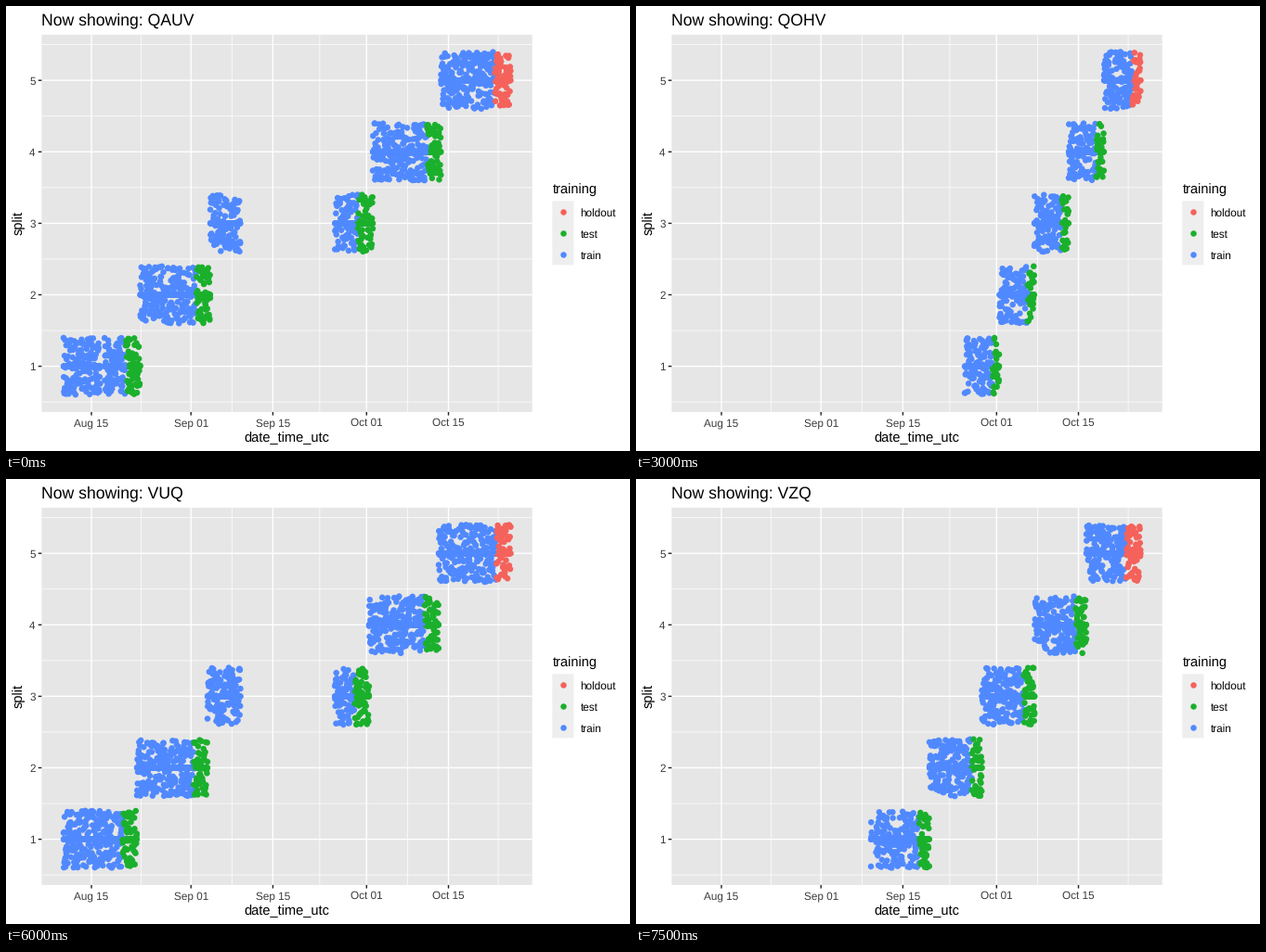
A matplotlib script for the animation above (8 s loop, 672 by 480 pixels).

```python
import numpy as np
import matplotlib.pyplot as plt
from matplotlib.animation import FuncAnimation
from matplotlib.patches import Rectangle

plt.rcParams["font.family"] = "Liberation Sans"
plt.rcParams["text.hinting"] = "none"

W, H, DPI = 672, 480, 96
PX = 72 / DPI
LEFT, RIGHT, TOP, BOTTOM = 38.4, 566.7, 31.0, 437.9
DAY = 6.305
ROW = 77.1
TRAIN, TEST, HOLDOUT = "#5089FF", "#1AB02C", "#F5625B"
DOT = (6.5 * PX) ** 2

SYMBOLS = ["QAUV", "QEZ", "QIJ", "QOHV", "QOWU", "QUJ", "VUQ", "VZQ"]

# edges: limits of the five splits, cuts: where training ends,
# gaps: spans without data, late: height of a lone late observation
MID_GAP = (252.5, 354)
SERIES = [
    dict(edges=[62, 144.5, 220, 395, 468.5, 543.5],
         cuts=[129, 205, 379, 453.5, 526.5], gaps=[MID_GAP, (101.5, 106)]),
    dict(edges=[62, 139, 215, 392, 467, 543.5],
         cuts=[123.5, 199.5, 376.5, 452, 528], gaps=[MID_GAP]),
    dict(edges=[354, 392, 430, 467, 505, 543.5],
         cuts=[385, 421.5, 459.5, 496.5, 535.5], gaps=[]),
    dict(edges=[354, 391.5, 429, 466, 504, 543.5],
         cuts=[384, 421.5, 458.5, 495.5, 534.5], gaps=[]),
    dict(edges=[62, 99, 138, 177, 214.5, 252.5],
         cuts=[91.5, 130, 168.5, 206.5, 244.5], gaps=[], late=4.85),
    dict(edges=[62, 151, 214.5, 388, 472.5, 543.5],
         cuts=[129, 201.5, 376, 448.5, 529.5],
         gaps=[MID_GAP, (83, 90.5), (142, 149), (433.5, 441), (457.5, 467)]),
    dict(edges=[62, 141, 217, 391, 466, 543.5],
         cuts=[125.5, 202, 375.5, 451, 528], gaps=[MID_GAP]),
    dict(edges=[62, 120, 178, 236.5, 295, 354],
         cuts=[108, 166, 224, 282.5, 341], gaps=[], late=5.13),
    dict(edges=[253, 316, 372.5, 429.5, 485, 543.5],
         cuts=[305, 361.5, 417.5, 473.5, 528], gaps=[(254, 258)]),
]


def row_y(split):
    return 388.6 - ROW * (split - 1)


def scatter_data(index, edges, cuts, gaps, late=None):
    """Hourly observations: one layer on the line, one jittered layer above."""
    rng = np.random.default_rng(40 + index)
    xs, splits, colors = [], [], []
    for i, cut in enumerate(cuts):
        held = HOLDOUT if i == 4 else TEST
        for x in np.arange(edges[i], edges[i + 1], DAY / 24):
            missing = any(a < x < b for a, b in gaps)
            if missing or rng.random() < 0.05:
                continue
            xs.append(x)
            splits.append(i + 1)
            colors.append(TRAIN if x < cut else held)
    heights = np.array(splits) + rng.uniform(-0.4, 0.4, len(xs))
    if late:
        xs.append(532.8)
        splits.append(5)
        colors.append(HOLDOUT)
        heights = np.append(heights, late)
    x = np.tile(xs, 2)
    y = row_y(np.concatenate([splits, heights]))
    settled = y.copy()
    moved = rng.integers(len(xs), 2 * len(xs) - 1, 5)
    settled[moved] += rng.uniform(-3, 3, 5)
    settled = np.clip(settled, row_y(5.4), row_y(0.6))
    return np.c_[x, y], np.c_[x, settled], colors * 2


DATA = [scatter_data(i, **s) for i, s in enumerate(SERIES)]

fig = plt.figure(figsize=(W / DPI, H / DPI), dpi=DPI, facecolor="white")
ax = fig.add_axes([0, 0, 1, 1])
ax.set_xlim(0, W)
ax.set_ylim(H, 0)
ax.axis("off")


def rect(x0, y0, x1, y1, color):
    ax.add_patch(Rectangle((x0, y0), x1 - x0, y1 - y0, fc=color, lw=0,
                           zorder=0, snap=False))


def line(xs, ys, color, width):
    ax.plot(xs, ys, color=color, lw=width * PX, solid_capstyle="butt",
            zorder=1, snap=False)


def label(x, y, text, size=8.8, color="black", **kw):
    return ax.text(x, y, text, fontsize=size, color=color, va="baseline", **kw)


rect(LEFT, TOP, RIGHT, BOTTOM, "#E6E6E6")

dates = {"Aug 15": 92.0, "Sep 01": 199.2, "Sep 15": 287.4,
         "Oct 01": 388.3, "Oct 15": 476.5}
major = list(dates.values())
minor = [(a + b) / 2 for a, b in zip(major, major[1:])] + [530.1]

for x in minor:
    line([x, x], [TOP, BOTTOM], "white", 0.71)
for s in range(6):
    line([LEFT, RIGHT], [row_y(s + 0.5)] * 2, "white", 0.71)
for name, x in dates.items():
    line([x, x], [TOP, BOTTOM], "white", 1.42)
    line([x, x], [BOTTOM, BOTTOM + 3.67], "#252525", 1.42)
    label(x, 453.2, name, color="#3C3C3C", ha="center")
for s in range(1, 6):
    y = row_y(s)
    line([LEFT, RIGHT], [y, y], "white", 1.42)
    line([LEFT - 3.67, LEFT], [y, y], "#252525", 1.42)
    label(31.6, y + 4.2, str(s), color="#3C3C3C", ha="right")

label((LEFT + RIGHT) / 2, 469.8, "date_time_utc", 11, ha="center")
label(17.6, 234.4, "split", 11, ha="center", rotation=90, rotation_mode="anchor")

label(588.3, 202.2, "training", 11)
rect(588.3, 210.3, 611.4, 279.4, "#EEEEEE")
for i, (name, color) in enumerate(
        [("holdout", HOLDOUT), ("test", TEST), ("train", TRAIN)]):
    y = 222.1 + 23.04 * i
    ax.scatter([600], [y], s=DOT, c=color, lw=0, zorder=2, snap=False)
    label(618.6, y + 4.7, name)

title = label(37.6, 20.2, "", 13.2)
dots = ax.scatter([], [], s=DOT, lw=0, zorder=3, snap=False)


def update(k):
    # points switch half a second before their title does
    fresh, settled, colors = DATA[(k + 1) // 2]
    dots.set_offsets(fresh if k % 2 else settled)
    dots.set_facecolors(colors)
    title.set_text("Now showing: " + SYMBOLS[k // 2])
    return dots, title


anim = FuncAnimation(fig, update, frames=16, interval=500, repeat=True,
                     repeat_delay=0)
plt.show()
```
